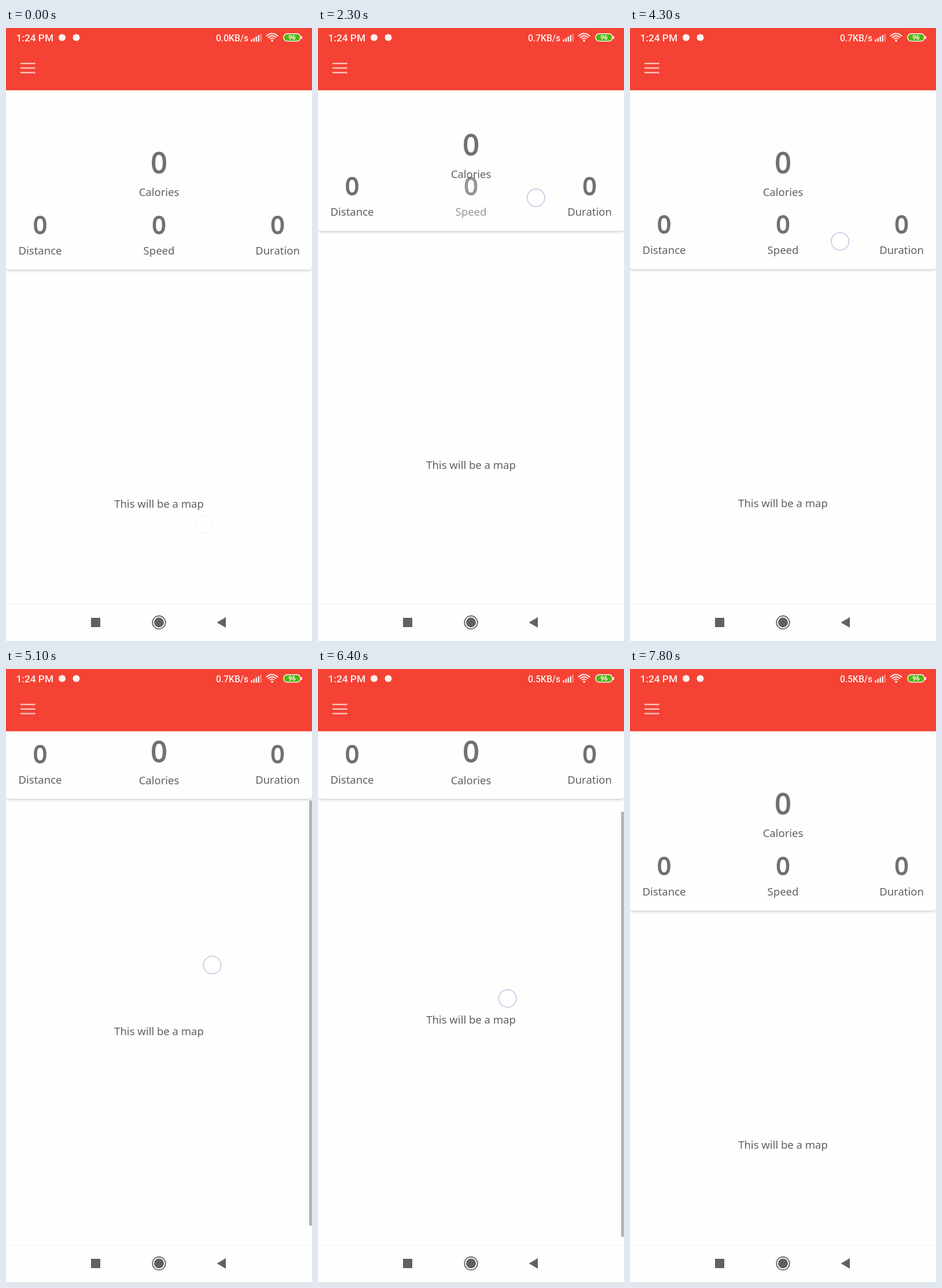
Recreate the animation shown at these times as an HTML page with a canvas. Size 529x1058 px, loop 8 s.

```html
<!DOCTYPE html>
<html lang="en">
<head>
<meta charset="utf-8">
<title>Workout tracker</title>
<style>
  html, body { margin: 0; width: 100%; height: 100%; overflow: hidden; background: #fdfffc; }
  canvas { display: block; }
</style>
</head>
<body>
<canvas id="stage" width="529" height="1058"></canvas>
<script>
const ctx = document.getElementById('stage').getContext('2d');
const LOOP = 8000, W = 529, H = 1058, MID = W / 2;
const TOOLBAR = 107.5, NAV_TOP = 995, CONTENT = 810;
const PAPER = '#fdfffc', RED = '#f44234', GREY = '#5f615f', WHITE = '#fff1ef';
const LABEL = '18.5px "Noto Sans", "Open Sans", sans-serif';
const TOUCH_LEAD = 60, TOUCH_SLOP = 8, DRAG_TIME = 450;

// Each drag on the header flips it between open and collapsed.
const headerDrags = [2200, 3400, 4300, 6900];

// Each swipe moves the finger up from (x, y), then down past it; release is a fraction of its length.
const swipes = [
  { start: 50, length: 1000, x: 342, y: 857, reach: 240, release: .55 },
  { start: 5090, length: 940, x: 357, y: 522, reach: 151, release: 1 },
  { start: 6030, length: 795, x: 345, y: 600, reach: 151, release: 1 },
];

const clamp = (v, low = 0, high = 1) => Math.max(low, Math.min(high, v));
const easeOut = u => Math.sin(clamp(u) * Math.PI / 2);

function headerOpenness(t) {
  return headerDrags.reduce((open, start, i) =>
    open + (i % 2 ? 1 : -1) * easeOut((t - start) / DRAG_TIME), 1);
}

function touchAlpha(t, start, end) {
  return Math.min(clamp((t - start + TOUCH_LEAD) / TOUCH_LEAD), clamp(1 - (t - end) / 150));
}

// Scroll offset, overscroll at either edge, scrollbar opacity and finger of the latest swipe.
function swipeState(t, room) {
  const swipe = swipes.filter(s => t >= s.start - TOUCH_LEAD).pop();
  const u = clamp((t - swipe.start) / swipe.length);
  const up = swipe.reach * Math.sin(2 * Math.PI * u);
  const travel = Math.sign(up) * Math.max(0, Math.abs(up) - TOUCH_SLOP);
  const end = swipe.start + swipe.length;
  return {
    scroll: clamp(travel, 0, room),
    pullTop: Math.max(0, -travel),
    pullBottom: Math.max(0, travel - room),
    bar: t < swipe.start ? 0 : clamp(1 - (t - end) / 250),
    x: swipe.x - 37 * u,
    y: swipe.y - up,
    touching: u < swipe.release,
    alpha: touchAlpha(t, swipe.start, swipe.start + swipe.length * swipe.release),
  };
}

function rect(x, y, w, h, color) {
  ctx.fillStyle = color;
  ctx.fillRect(x, y, w, h);
}

function disc(x, y, r, color) {
  ctx.fillStyle = color;
  ctx.beginPath();
  ctx.arc(x, y, r, 0, Math.PI * 2);
  ctx.fill();
}

function arc(x, y, r, width, color, from = 0, to = Math.PI * 2) {
  ctx.strokeStyle = color;
  ctx.lineWidth = width;
  ctx.beginPath();
  ctx.arc(x, y, r, from, to);
  ctx.stroke();
}

function text(str, x, y, font, color, align = 'center') {
  ctx.font = font;
  ctx.fillStyle = color;
  ctx.textAlign = align;
  ctx.fillText(str, x, y);
}

function stat(label, x, zeroY, labelY, size) {
  const color = '#70726f', baseline = zeroY + size * .357;
  text('0', x, baseline, `500 ${size}px "Noto Sans", sans-serif`, color);
  ctx.strokeStyle = color;
  ctx.lineWidth = 1.8;
  ctx.lineJoin = 'round';
  ctx.strokeText('0', x, baseline);
  text(label, x, labelY, LABEL, GREY);
}

// Edge glow: a wide circle segment flattened towards the edge.
function glow(edge, direction, pull, center) {
  if (pull <= 0) return;
  const strength = .036 * Math.sqrt(pull);
  const r = W * 1.2, depth = r * (1 - Math.cos(Math.PI / 6));
  ctx.save();
  ctx.beginPath();
  ctx.rect(0, direction > 0 ? edge : 0, W, direction > 0 ? H : edge);
  ctx.clip();
  ctx.translate(center, edge);
  ctx.scale(1, strength * direction);
  disc(0, depth - r, r, `rgba(230,70,55,${.25 * strength * strength})`);
  ctx.restore();
}

function drawContent(top, swipe) {
  const view = NAV_TOP - top;
  text('This will be a map', MID, top + 411 - swipe.scroll, LABEL, GREY);

  const center = swipe.touching ? (MID + swipe.x) / 2 : MID;
  glow(top, 1, swipe.pullTop, center);
  glow(NAV_TOP, -1, swipe.pullBottom, center);

  rect(524, top + swipe.scroll * view / CONTENT, 5, view * view / CONTENT, `rgba(0,0,0,${.29 * swipe.bar})`);
}

function drawHeader(open, top) {
  ctx.save();
  ctx.shadowColor = 'rgba(0,0,0,.22)';
  ctx.shadowBlur = 5;
  ctx.shadowOffsetY = 1.5;
  ctx.fillStyle = PAPER;
  ctx.beginPath();
  ctx.roundRect(0, 60, W, top - 60, 5);
  ctx.fill();
  ctx.restore();

  stat('Distance', 59, top - 77, top - 26, 42);
  stat('Duration', 469.5, top - 77, top - 26, 42);
  ctx.globalAlpha = open;
  stat('Speed', MID, top - 77, top - 26, 42);
  ctx.globalAlpha = 1;
  stat('Calories', MID, 143 + 90 * open, 199 + 91 * open, 49);
}

function drawToolbar(t) {
  rect(0, 0, W, TOOLBAR, RED);
  for (let i = 0; i < 3; i++) rect(25, 60 + i * 7.9, 25.5, 2.4, '#fcc4be');

  text('1:24 PM', 17.5, 23, '500 17.3px Roboto, sans-serif', WHITE, 'left');
  disc(97, 16.5, 6, WHITE);
  disc(121.5, 16.5, 6, WHITE);

  const rate = t < 1500 ? '0.0' : t < 5500 ? '0.7' : '0.5';
  text(rate + 'KB/s', 363, 22.5, '500 15.6px Roboto, sans-serif', WHITE, 'left');

  for (let i = 0; i < 5; i++) {
    const h = 4 + i * 2.4;
    rect(423.5 + i * 4, 23.5 - h, 2.4, h, i < 4 ? WHITE : '#f98d84');
  }

  for (let i = 0; i < 3; i++) arc(460, 22, 4.5 + i * 4, 2, WHITE, -Math.PI * .79, -Math.PI * .21);
  disc(460, 22, 1.8, WHITE);

  ctx.fillStyle = '#52b612';
  ctx.strokeStyle = WHITE;
  ctx.lineWidth = 1.6;
  ctx.beginPath();
  ctx.roundRect(480, 9.8, 29, 13, 6);
  ctx.fill();
  ctx.stroke();
  rect(510, 14, 2, 5, WHITE);
  text('96', 494.5, 20.3, '700 11px Roboto, sans-serif', WHITE);
}

function drawNavigation() {
  const y = 1026;
  rect(0, NAV_TOP - 1, W, H - NAV_TOP + 1, PAPER);
  rect(0, NAV_TOP - 1, W, 1, '#eff1ee');
  rect(147, y - 8, 16, 16, GREY);
  disc(264.5, y, 8.5, GREY);
  arc(264.5, y, 11.3, 1.7, GREY);
  ctx.fillStyle = GREY;
  ctx.beginPath();
  ctx.moveTo(364.5, y);
  ctx.lineTo(380, y - 9);
  ctx.lineTo(380, y + 9);
  ctx.fill();
}

function drawTouch(x, y, alpha) {
  ctx.globalAlpha = alpha;
  disc(x, y, 15, 'rgba(255,255,255,.6)');
  arc(x, y, 15.2, 2, '#d1d1e9');
  ctx.globalAlpha = 1;
}

function draw(now) {
  const t = now % LOOP;
  const open = headerOpenness(t);
  const top = 224 + 193 * open;
  const swipe = swipeState(t, CONTENT - (NAV_TOP - top));

  rect(0, 0, W, H, PAPER);
  drawContent(top, swipe);
  drawHeader(open, top);
  drawToolbar(t);
  drawNavigation();

  drawTouch(swipe.x, swipe.y, swipe.alpha);
  for (const start of headerDrags) {
    drawTouch(403 - 40 * open, 149 + 220 * open, touchAlpha(t, start, start + DRAG_TIME));
  }
}

const began = performance.now();
function tick() {
  draw(performance.now() - began);
  requestAnimationFrame(tick);
}
tick();
</script>
</body>
</html>
```
